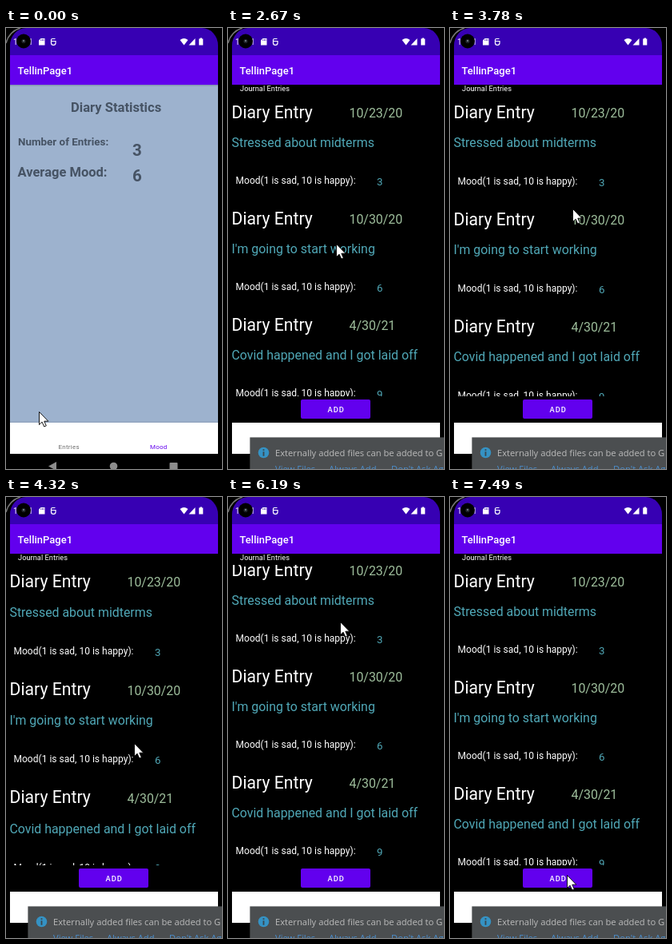
Recreate the animation shown at these times as an HTML page. Size 270 by 552 pixels, loop 8000 ms.

```html
<!DOCTYPE html>
<html lang="en">
<head>
<meta charset="utf-8">
<title>Diary app</title>
<style>
html, body { margin: 0; width: 100%; height: 100%; overflow: hidden; background: #000; }
svg { display: block; width: 100vw; height: 100vh; font-family: Roboto, sans-serif; }
text { white-space: pre; }
.bold { font-weight: 700; fill: #465364; }
.tab { font-size: 8px; letter-spacing: .25px; text-anchor: middle; }
.note { font: 11.2px "Open Sans", sans-serif; fill: #bbb; }
.link { fill: #4a8fd0; }
</style>
</head>
<body>
<svg viewBox="0 0 270 552">
  <defs>
    <clipPath id="listClip"><rect x="5" y="85" width="260" height="376"/></clipPath>
    <clipPath id="tabClip"><rect x="5" y="494" width="260" height="39"/></clipPath>
    <radialGradient id="glow">
      <stop offset="0" stop-color="#c9c9c9"/>
      <stop offset=".72" stop-color="#d6d6d6"/>
      <stop offset="1" stop-color="#e4e4e4" stop-opacity="0"/>
    </radialGradient>
  </defs>
  <rect width="270" height="552"/>

  <g id="stats">
    <rect x="5" y="71" width="260" height="423" fill="#9db2ce"/>
    <rect x="5" y="71" width="260" height="1.5" fill="#8496b4"/>
    <rect x="5" y="492.5" width="260" height="1.5" fill="#93a6c0"/>
    <g class="bold">
      <text x="81" y="105" font-size="16.6">Diary Statistics</text>
      <text x="15" y="147" font-size="13.4">Number of Entries:</text>
      <text x="14.5" y="186" font-size="16.5">Average Mood:</text>
      <text x="158" y="159.5" font-size="20.5">3</text>
      <text x="158" y="192" font-size="20.5">6</text>
    </g>
  </g>

  <g id="journal">
    <text x="15" y="79" font-size="9.3" fill="#fff">Journal Entries</text>
    <g clip-path="url(#listClip)"><g id="list"></g></g>
    <rect x="91" y="465" width="87" height="24" rx="2" fill="#6200ee"/>
    <text x="124.5" y="480.7" font-size="9.3" font-weight="500" letter-spacing="1" fill="#fff">ADD</text>
  </g>

  <path d="M5 34V22A20 22 0 0 1 25 0H245A20 22 0 0 1 265 22V34Z" fill="#3700b3"/>
  <path d="M0 19Q4 4 18 0" fill="none" stroke="#777" stroke-width="1.5"/>
  <rect x="5" y="34" width="260" height="37" fill="#6200ee"/>
  <text x="14.5" y="58" font-size="13" font-weight="500" fill="#fff">TellinPage1</text>

  <g fill="#fff">
    <text x="9" y="21" font-size="10">1</text>
    <text x="28" y="21" font-size="10">1</text>
    <path d="M43.5 13H48.5V21.5H41V15.5Z"/>
    <path d="M217.5 15Q222.5 10.8 227.5 15L222.5 21.5Z"/>
    <path d="M236.5 13V21.5H228.5Z"/>
    <path d="M242.5 12.5H245V13.5H246.3V21.5H241.2V13.5H242.5Z"/>
  </g>
  <path d="M43.7 14.3V16M45.4 14V16M47 14V16" stroke="#3700b3" stroke-width=".7"/>
  <path d="M61.5 13.5H58Q56.5 13.5 56.5 15V16.5H62V19Q62 21.3 59.3 21.3Q56.5 21.3 56.5 19V16.5" fill="none" stroke="#fff" stroke-width="1.2"/>
  <circle cx="22" cy="16.5" r="9"/>
  <circle cx="22" cy="16.5" r="2.6" fill="#20242a"/>
  <circle cx="22" cy="16" r="1" fill="#7e8a94"/>

  <rect x="5" y="494" width="260" height="39" fill="#fff"/>
  <circle id="ripple" cx="78" cy="516" fill="url(#glow)" clip-path="url(#tabClip)"/>
  <text id="tabEntries" class="tab" x="78.7" y="526.5">Entries</text>
  <text id="tabMood" class="tab" x="190.8" y="526.5">Mood</text>

  <g fill="#8c8c8c">
    <path d="M53 548.5L63 543V554Z"/>
    <circle cx="134.5" cy="548.5" r="4.8"/>
    <rect x="204.5" y="544" width="10" height="10" rx="1"/>
  </g>

  <g id="popup">
    <rect x="27.4" y="512.4" width="243" height="40" fill="#4b4e50"/>
    <circle cx="44.5" cy="531.5" r="6.8" fill="#3592c4"/>
    <path d="M44.5 527.3V529M44.5 530.3V535.8" stroke="#3b464d" stroke-width="1.8"/>
    <text class="note" x="59" y="536">Externally added files can be added to G</text>
    <text class="note link" x="59" y="556">View Files</text>
    <text class="note link" x="126" y="556">Always Add</text>
    <text class="note link" x="204" y="556">Don't Ask Again</text>
  </g>

  <path id="cursor" d="M.5 .5V16.6L4.1 13.2L6.7 19L9.3 17.9L6.8 12.2H11.8Z" fill="#fff" stroke="#000" stroke-width=".9"/>
</svg>
<script>
const LOOP = 8000, STEP = 133.5, LEAD = 30;
const TOP = 85, BOTTOM = 461, MAX_SCROLL = 23.5, PITCH = 133;
const TAP = 12, OPEN = 14, POPUP = 18;
const $ = id => document.getElementById(id);

const entries = [
  ["10/23/20", "Stressed about midterms", 3],
  ["10/30/20", "I'm going to start working", 6],
  ["4/30/21", "Covid happened and I got laid off", 9],
];
const TEAL = "#50a8b7";
const label = (x, y, size, fill, s) =>
  `<text x="${x}" y="${y}" font-size="${size}" fill="${fill}">${s}</text>`;
$("list").innerHTML = entries.map(([date, note, mood], i) => {
  const y = i * PITCH;
  return label(4.5, y + 112.5, 21.2, "#fff", "Diary Entry") +
    label(151.5, y + 112, 15.9, "#9dbd9b", date) +
    label(4.5, y + 149, 15.9, TEAL, note) +
    label(9.5, y + 195.3, 12.05, "#fff", "Mood(1 is sad, 10 is happy):") +
    label(186, y + 197, 13.2, TEAL, mood);
}).join("");

const easeIn = f => f * f;
const easeOut = f => 1 - (1 - f) ** 2;
const smooth = f => f * f * (3 - 2 * f);

// Each move: start step, end step, easing, then the values reached.
const pointer = [
  [0, 4, easeOut, 77, 521],
  [4, 8, easeOut, 78, 518],
  [15, 20, easeOut, 135, 270],
  [20, 24, easeOut, 144, 124],
  [26, 30, smooth, 162, 328],
  [31, 36, smooth, 140, 131],
  [43, 54, easeIn, 146, 468],
  [54, 56, easeIn, 146, 473],
];
// Pull below 0 or above MAX_SCROLL stretches the list.
const drag = [
  [20, 24, easeOut, 43],
  [26, 30, easeOut, -24],
  [31, 36, smooth, 43],
  [43, 53, easeOut, -14],
  [53, 54, easeOut, 0],
];

function follow(start, moves, n) {
  return moves.reduce((at, [from, to, ease, ...goal]) => {
    const f = ease(Math.min(1, Math.max(0, (n - from) / (to - from))));
    return at.map((v, i) => v + (goal[i] - v) * f);
  }, start);
}

const show = (id, on) => $(id).setAttribute("display", on ? "inline" : "none");
const setTab = (id, on) => $(id).setAttribute("fill", on ? "#6200ee" : "#707070");

function render(time) {
  const n = Math.floor((time + LEAD) / STEP);

  const [x, y] = follow([41, 480], pointer, n);
  $("cursor").setAttribute("transform", `translate(${Math.round(x)} ${Math.round(y)})`);

  const [pull] = follow([0], drag, n);
  const scroll = Math.min(MAX_SCROLL, Math.max(0, pull));
  const stretch = 1 + Math.abs(pull - scroll) * .001;
  const edge = pull < 0 ? TOP : BOTTOM;
  $("list").setAttribute("transform",
    `translate(0 ${edge}) scale(1 ${stretch}) translate(0 ${-edge - scroll})`);

  const tapped = n >= TAP, opened = n >= OPEN;
  show("stats", !opened);
  show("journal", opened);
  show("popup", n >= POPUP);
  setTab("tabEntries", tapped);
  setTab("tabMood", !tapped);

  show("ripple", tapped && n <= OPEN);
  $("ripple").setAttribute("r", n > TAP ? 29 : 22);
  $("ripple").setAttribute("opacity", opened ? .4 : 1);
}

function loop() {
  render(performance.now() % LOOP);
  requestAnimationFrame(loop);
}
loop();
</script>
</body>
</html>
```
